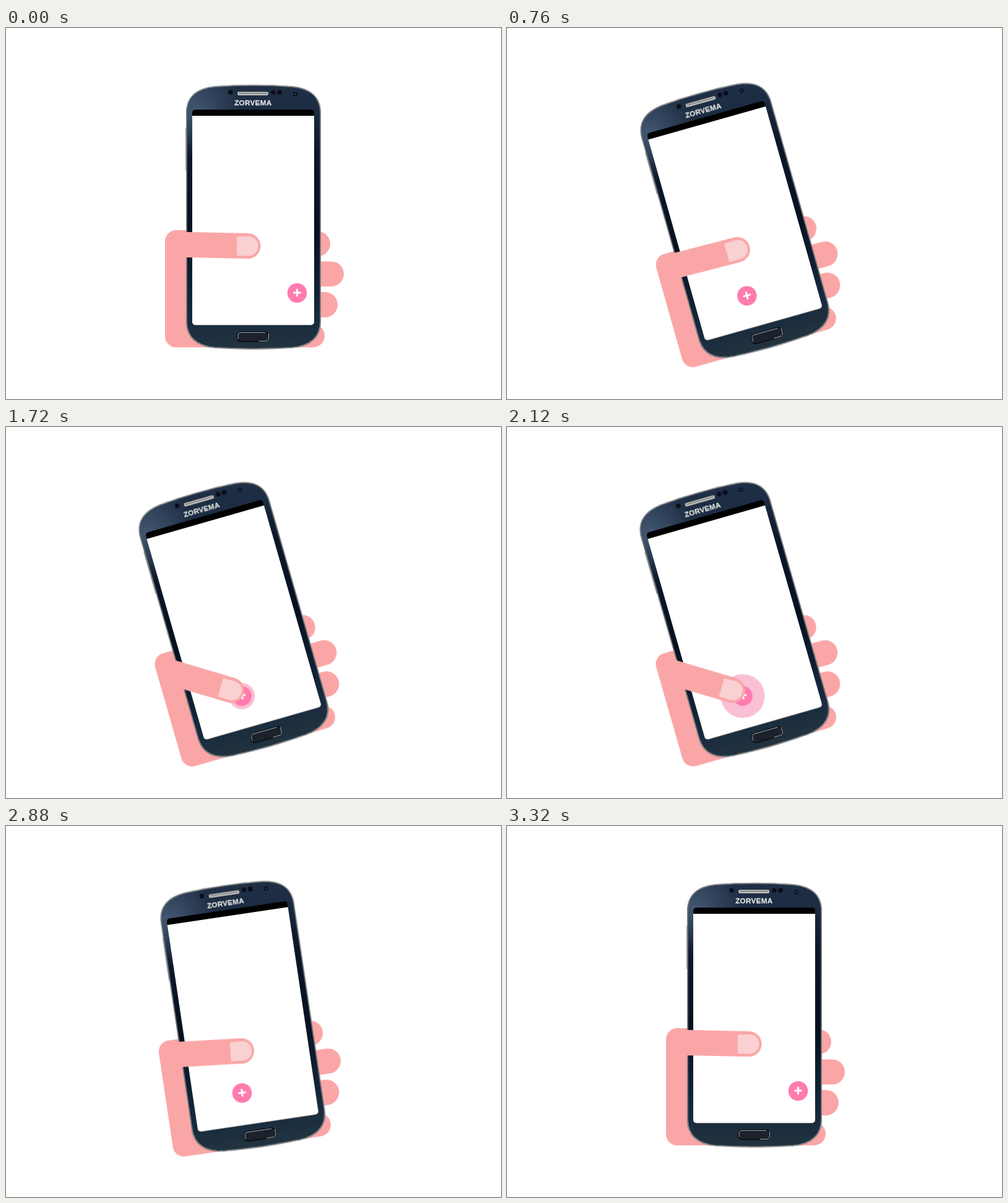
Recreate the animation shown at these times as an HTML page. Size 800 by 600 pixels, loop 4000 ms.

```html
<!DOCTYPE html>
<html lang="en">
<head>
<meta charset="utf-8">
<title>Phone tap</title>
<style>
  html, body { margin: 0; width: 100%; height: 100%; overflow: hidden; background: #fff; }
  svg { display: block; width: 100%; height: 100%; }

  .device, .thumb, .slide, .ripple { animation: 4s linear infinite; }
  .device { transform-origin: 403.3px 423px; animation-name: tilt; }
  .thumb { transform-origin: 266.8px 337.2px; animation-name: press; }
  .slide { animation-name: slide; }
  .ripple { transform-origin: 470.5px 428.5px; animation-name: ripple, blink; }
  .skin { fill: #faa6a7; }

  @keyframes tilt {
    0%, 5% { transform: rotate(0deg); animation-timing-function: cubic-bezier(.8, 0, .65, 1); }
    20%, 63% { transform: rotate(-16deg); animation-timing-function: cubic-bezier(.8, 0, .65, 1); }
    76.75%, 100% { transform: rotate(0deg); }
  }
  @keyframes slide {
    0%, 6% { transform: translateX(0); animation-timing-function: cubic-bezier(.95, 0, .65, 1); }
    21%, 69% { transform: translateX(-91.9px); animation-timing-function: cubic-bezier(.95, 0, .65, 1); }
    83%, 100% { transform: translateX(0); }
  }
  @keyframes press {
    0%, 25% { transform: rotate(0deg); animation-timing-function: ease-in-out; }
    32.5% { transform: rotate(29.3deg); animation-timing-function: ease-out; }
    42.5%, 63% { transform: rotate(31.3deg); animation-timing-function: ease-in-out; }
    75%, 100% { transform: rotate(0deg); }
  }
  @keyframes ripple {
    0%, 39% { transform: scale(.4); }
    53% { transform: scale(.922); }
    56.5%, 100% { transform: scale(1); }
  }
  @keyframes blink {
    0% { opacity: 0; animation-timing-function: step-end; }
    39% { opacity: .4; animation-timing-function: step-end; }
    56.9%, 100% { opacity: 0; }
  }
</style>
</head>
<body>
<svg viewBox="0 0 800 600">
  <defs>
    <linearGradient id="shell" x1="0" y1="0" x2="0" y2="1">
      <stop offset="0" stop-color="#1f2f45"/>
      <stop offset=".09" stop-color="#1c2c42"/>
      <stop offset=".25" stop-color="#0b1829"/>
      <stop offset=".55" stop-color="#051120"/>
      <stop offset=".88" stop-color="#172a3e"/>
      <stop offset="1" stop-color="#22333f"/>
    </linearGradient>
    <radialGradient id="sheen" gradientUnits="userSpaceOnUse" cx="305" cy="135" r="75">
      <stop offset="0" stop-color="#566b87" stop-opacity=".7"/>
      <stop offset="1" stop-color="#566b87" stop-opacity="0"/>
    </radialGradient>
    <path id="body" d="M292 138C292 111 308 98 338 95Q400 90.500 462 95C492 98 508 111 508 138V474C508 500 492 514 462 516.800Q400 520.500 338 516.800C308 514 292 500 292 474Z"/>
  </defs>

  <g class="device">
    <!-- palm and fingers behind the phone -->
    <g class="skin">
      <rect x="257" y="327" width="150" height="189.500" rx="18"/>
      <rect x="440" y="329" width="84" height="40" rx="20"/>
      <rect x="440" y="377.500" width="106" height="40.500" rx="20.250"/>
      <rect x="440" y="427" width="96" height="41" rx="20.500"/>
      <rect x="440" y="479" width="75" height="37.500" rx="18.750"/>
    </g>

    <!-- phone -->
    <path d="M291.200 161V231" stroke="#555b62" stroke-width="1.500"/>
    <use href="#body" fill="none" stroke="#3a3d40" stroke-width="2"/>
    <use href="#body" fill="url(#shell)" stroke="#949594" stroke-width="1.400"/>
    <use href="#body" fill="url(#sheen)"/>
    <rect x="301" y="132" width="197" height="349" rx="5" fill="#000"/>
    <path d="M301 142H498V475.500A5 5 0 0 1 493 480.500H306A5 5 0 0 1 301 475.500Z" fill="#fff"/>

    <rect x="374" y="103" width="50" height="6" rx="2" fill="#d3d3d1" stroke="#30363f" stroke-width=".6"/>
    <path d="M376.500 105.800H422" stroke="#4b4d50" stroke-width="2.600" stroke-dasharray="1.300 1.200"/>
    <g fill="#0b0d1c">
      <circle cx="363" cy="104" r="3.800"/>
      <circle cx="432" cy="104" r="3.700"/>
      <circle cx="442" cy="104" r="4"/>
      <circle cx="467.500" cy="107" r="3.400"/>
    </g>
    <circle cx="467.500" cy="107" r="1.200" fill="#5a4b45"/>
    <text x="399.300" y="124.600" text-anchor="middle" font-family="'Liberation Sans', Arial, sans-serif" font-size="11.700" font-weight="700" letter-spacing=".3" fill="#dfe1e1" stroke="#dfe1e1" stroke-width=".3">ZORVEMA</text>

    <rect x="373.500" y="491.500" width="51.500" height="15.500" rx="6" fill="#1c222b" stroke="#070a0e" stroke-width="1.500"/>
    <path d="M375 503V497Q375 492.500 380 492.500H419M424.500 494V502Q424 506.500 419 506.500H409" fill="none" stroke="#a5abaf" stroke-width="1"/>

    <!-- floating button -->
    <g class="slide">
      <circle class="ripple" cx="470.500" cy="428.500" r="38.500" fill="#ef5f96"/>
      <circle cx="470.500" cy="428.500" r="15.800" fill="#ff7bae"/>
      <path d="M465.500 428H475.500M470.500 423V433" stroke="#fff" stroke-width="3" stroke-linecap="round"/>
    </g>

    <g class="thumb">
      <path class="skin" d="M275 329.600L391 332A20.500 20.500 0 0 1 391 373L280 370.800Z"/>
      <path d="M373 337.500L392 337A15.700 15.700 0 0 1 392 368.400L373 368Z" fill="#f9d1d2"/>
    </g>
  </g>
</svg>
</body>
</html>
```
